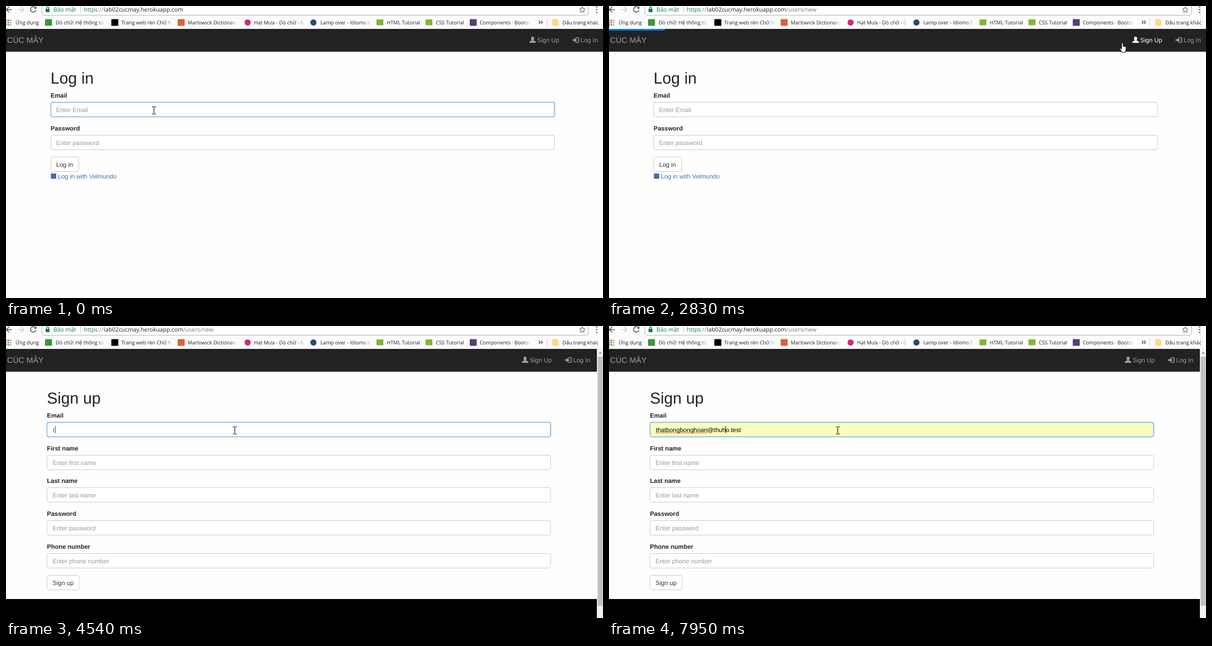
Recreate the animation shown at these times as an HTML page. Size 1071 px wide and 523 px high, loop 8 s.

```html
<!DOCTYPE html>
<html lang="en">
<head>
<meta charset="utf-8">
<title>Sign up form</title>
<style>
html, body { margin: 0; width: 100%; height: 100%; overflow: hidden; background: #fefefe; }
svg { display: block; text-rendering: geometricPrecision; }
text { white-space: pre; }
.page { font: 11.1px "Liberation Sans", Arial, sans-serif; }
.page text { fill: #333; }
.page .bold { font-weight: bold; fill: #222; }
.page .hint { fill: #999; }
.ui { font: 9.2px "Open Sans", "Noto Sans", sans-serif; fill: #222; }
.url { font-size: 10.4px; }
.box { fill: #fff; stroke: #ccc; }
</style>
</head>
<body>
<svg id="stage" width="1071" height="523" viewBox="0 0 1071 523"></svg>
<script>
const LOOP = 8000;
const EMAIL = "thatbongbonghoan@thuho.test";
const TYPED = 8;
const TEXT_X = 84;
const FIELD_W = 903.5;
const stage = document.getElementById("stage");

const text = (x, y, s, attrs = "") => `<text x="${x}" y="${y}" ${attrs}>${s}</text>`;
const rect = (x, y, w, h, attrs = "") =>
  `<rect x="${x}" y="${y}" width="${w}" height="${h}" ${attrs}/>`;
const path = (d, attrs = "") => `<path d="${d}" ${attrs}/>`;
const dot = (x, y, r, fill) => `<circle cx="${x}" cy="${y}" r="${r}" fill="${fill}"/>`;
const line = (d, color, w = 1) => path(d, `fill="none" stroke="${color}" stroke-width="${w}"`);

// Browser chrome

// A label that runs past its end is cut there and fades out
function bookmark(x, label, icon, end) {
  if (!end) return icon + text(x, 33, label);
  return `${icon}<svg x="${x}" y="0" width="${end - x}" height="41">${text(0, 33, label)}</svg>` +
    rect(end - 14, 20, 14, 19, 'fill="url(#fade)"');
}

function appsGrid() {
  const colors = ["#e2483d", "#e2483d", "#e8a33d", "#3f9c5a", "#4a86e8", "#e8a33d", "#3f9c5a", "#3f9c5a", "#e8a33d"];
  return colors.map((c, i) => rect(-1 + i % 3 * 4, 24.5 + Math.floor(i / 3) * 4, 2.6, 2.6, `fill="${c}"`)).join("");
}

function browser() {
  const square = (x, color, y = 23.5, h = 12) => rect(x, y, 12.5, h, `rx="1" fill="${color}"`);
  return `<g class="ui">
    ${rect(0, 0, 1071, 41, 'fill="#fcfcfc"')}
    ${path("M64.5 -4V13Q64.5 16.5 68 16.5H1041Q1044.5 16.5 1044.5 13V-4", 'fill="#fff" stroke="#b4b4b4"')}
    ${line("M10.5 6.5H1M5.5 1.5L.5 6.5L5.5 11.5", "#555", 1.5)}
    ${line("M22 6.5H31.5M27 1.5L32 6.5L27 11.5", "#d0d0d0", 1.5)}
    ${line("M52.8 3A4.9 4.9 0 1 0 53.8 7.5", "#555", 1.5)}
    ${path("M54.5 .5V5H50Z", 'fill="#555"')}
    ${rect(71, 5, 7, 6, 'rx=".6" fill="#0b8043"')}
    ${line("M72.5 5V3.4a2 2 0 0 1 4 0V5", "#0b8043", 1.3)}
    <g class="url">
      ${text(85, 10, "Bảo mật", 'fill="#0b8043"')}
      ${line("M133.5 0V13", "#ccc")}
      ${text(139.5, 10, 'https<tspan fill="#777">://</tspan>', 'fill="#0b8043"')}
      ${text(175.5, 10, 'lab02cucmay.herokuapp.com<tspan id="route" fill="#777">/users/new</tspan>')}
    </g>
    ${path("M1034 1.5l1.5 3.4 3.7.4-2.8 2.5.8 3.7-3.2-1.9-3.2 1.9.8-3.7-2.8-2.5 3.7-.4z", 'fill="none" stroke="#555"')}
    ${[1.5, 6.5, 11.5].map(y => dot(1059.5, y, 1.2, "#555")).join("")}
    ${rect(975, 19, 92, 20, 'id="folderHover" rx="2" fill="#ececec"')}
    ${appsGrid()}
    ${text(17, 33, "Ứng dụng")}
    ${bookmark(89, "Dò chữ: Hệ thống từ điển", square(70, "#3c963c"), 178)}
    ${bookmark(207, "Trang web rèn Chữ Nghĩa", square(189, "#000"), 298)}
    ${bookmark(326, "Marlowick Dictionary", square(308, "#d8652f"), 416)}
    ${bookmark(445, "Hạt Mưa - Dò chữ - Dò chữ", dot(433.5, 29.5, 5.5, "#d4257c"), 536)}
    ${bookmark(564, "Lamp over - Idioms by Quill", dot(551.5, 29.5, 5.5, "#1f4e79"), 655)}
    ${bookmark(683, "HTML Tutorial", square(664.5, "#7ab835", 24, 10.5))}
    ${bookmark(771, "CSS Tutorial", square(752.5, "#7ab835", 24, 10.5))}
    ${bookmark(850, "Components · Bootstrap", square(832, "#563d7c"), 941)}
    ${line("M956 26.5L958.5 29.3L956 32M960 26.5L962.5 29.3L960 32", "#333", 1.2)}
    ${line("M970.5 23V36", "#ccc")}
    ${path("M980.5 24H988L990.5 26.5V35H980.5Z", 'fill="#fbdc82" stroke="#ecc75f" stroke-width=".6"')}
    ${text(998, 33, "Dấu trang khác")}
  </g>`;
}

// Page

function nav() {
  return `${rect(0, 41, 1071, 40.5, 'fill="#222"')}${rect(0, 80.7, 1071, .8, 'fill="#080808"')}
    ${text(2, 66, "CÚC MÂY", 'font-size="14.2" style="fill:#9d9d9d"')}
    <g id="links">
      <g id="signLink">
        <ellipse cx="944.7" cy="58.3" rx="2.8" ry="3.5"/>
        ${path("M939 66V64.3Q939.3 63 943 61.6H946.4Q950.1 63 950.4 64.3V66Z")}
        ${text(953, 65, "Sign Up", 'style="fill:inherit"')}
      </g>
      <g fill="#9d9d9d">
        ${path("M1016.5 59.5H1020V56.8L1024.5 61L1020 65.2V62.5H1016.5Z")}
        ${line("M1022 56.7H1025.8Q1027.5 56.7 1027.5 58.4V63.6Q1027.5 65.3 1025.8 65.3H1022", "#9d9d9d", 1.5)}
        ${text(1031, 65, "Log In", 'style="fill:inherit"')}
      </g>
    </g>`;
}

const field = (x, i, label, hint) => {
  const y = 58.7 * i;
  return text(x, 164 + y, label, 'class="bold"') +
    rect(Math.floor(x) + .5, Math.round(172 + y) + .5, FIELD_W, 26, 'class="box" rx="3"') +
    text(x + 10, 190 + y, hint, 'class="hint"');
};

const button = (x, y, w, label) =>
  rect(Math.floor(x) + .5, y + .5, w, 26, 'class="box" rx="3"') + text(x + 10, y + 17.5, label);

const title = (x, s) => text(x, 139, s, 'font-size="28.4" style="fill:#222"');

const glow = (x, id) => `<g id="${id}" fill="none" stroke="#66afe9">
  ${rect(x, 172.5, FIELD_W, 26, 'rx="3" stroke-width="1.5" opacity=".45" filter="url(#blur)"')}
  ${rect(x, 172.5, FIELD_W, 26, 'rx="3"')}</g>`;

function loginPage() {
  return `<g id="login">
    ${title(80, "Log in")}
    ${field(80, 0, "Email", "Enter Email")}
    ${field(80, 1, "Password", "Enter password")}
    ${glow(80.5, "loginGlow")}
    ${button(80, 270, 50, "Log in")}
    ${rect(80.5, 300, 9.5, 9.5, 'rx="1" fill="#3b6cb4"')}
    ${text(93, 309, "Log in with Velmundo", 'style="fill:#3b73b4"')}
  </g>`;
}

function signupPage() {
  const x = 73.5;
  const fields = [["Email", ""], ["First name", "Enter first name"], ["Last name", "Enter last name"],
    ["Password", "Enter password"], ["Phone number", "Enter phone number"]];
  return `<g id="signup">
    ${title(x, "Sign up")}
    ${fields.map(([label, hint], i) => field(x, i, label, hint)).join("")}
    ${rect(x, 172.5, FIELD_W, 26, 'id="filled" rx="3" fill="#faffbd"')}
    ${glow(x, "signupGlow")}
    ${text(TEXT_X - .5, 190, "Enter Email", 'id="emailHint" class="hint"')}
    ${rect(0, 179, 0, 13, 'id="mark" fill="#3390ff"')}
    <text id="email" x="${TEXT_X}" y="190"><tspan id="head"></tspan><tspan id="tail"></tspan></text>
    <path id="squiggle" fill="none" stroke="#e02020" stroke-dasharray="2 1"/>
    ${button(x, 446, 57.5, "Sign up")}
    ${rect(0, 489, 1060, 34, 'fill="#000"')}
    ${rect(1060, 41, 11, 482, 'fill="#f1f1f1"')}
    ${rect(1061.5, 55, 9, 446, 'fill="#c1c1c1"')}
    ${path("M1063.5 49.5L1066 46.5L1068.5 49.5Z", 'fill="#777"')}
    <g id="menu" class="ui" style="font-size:9.1px;font-weight:bold">
      <rect id="menuBox" x="73.5" y="199.5" width="905" fill="#fff" stroke="#ccc"/>
      ${rect(74, 199, 904.5, 20, 'id="menuHover" fill="#c0dcf5"')}
      ${text(80, 213, EMAIL, 'style="fill:#000"')}
      ${text(80, 232, "thatbong.hoan@thuho.test", 'style="fill:#000"')}
      ${text(80, 251.5, "thatbe@thuho.test", 'id="third" style="fill:#000"')}
    </g>
  </g>`;
}

const CURSORS = {
  beam: line("M-3-6.5H-.5L.5-5.7L1.5-6.5H4M.5-6V6M-3 6.5H-.5L.5 5.7L1.5 6.5H4", "#000"),
  arrow: path("M0 0V13L3 10.3L5 15L7 14.1L5 9.5H9Z", 'fill="#fff" stroke="#222"'),
  hand: path("M-1.3 9V1.2A1.3 1.3 0 0 1 1.3 1.2V6L5.6 7Q7 7.4 6.7 9L6.2 13L5.2 17H-.6L-4.2 11Q-4.8 9.4-3 9.6L-1.3 11Z",
    'fill="#fff" stroke="#111"')
};

stage.innerHTML = `<defs>
    <linearGradient id="fade"><stop stop-color="#fcfcfc" stop-opacity="0"/><stop offset="1" stop-color="#fcfcfc"/></linearGradient>
    <filter id="blur" x="-2%" y="-50%" width="104%" height="200%"><feGaussianBlur stdDeviation="1.4"/></filter>
  </defs>
  ${rect(0, 0, 1071, 523, 'fill="#fefefe"')}
  <g class="page">${loginPage()}${nav()}${signupPage()}</g>
  ${rect(0, 41, 0, 3, 'id="bar" fill="#0076ff"')}
  ${browser()}
  ${rect(0, 179, 1, 13, 'id="caret"')}
  ${Object.entries(CURSORS).map(([id, shape]) => `<g id="${id}">${shape}</g>`).join("")}`;

// Timeline: each row is [start time, ...values], held until the next row

const POINTER = [
  [0, "beam", 265, 187], [130, "beam", 300, 194], [270, "arrow", 380, 212], [400, "beam", 520, 187],
  [540, "arrow", 680, 140], [680, "arrow", 830, 90], [810, "arrow", 930, 50], [950, "arrow", 1000, 26],
  [1090, "hand", 995, 48], [1210, "hand", 978, 54], [1350, "hand", 966, 57],
  [2710, "hand", 952, 60], [2830, "hand", 921, 66], [2980, "arrow", 716, 108], [3120, "arrow", 575, 142],
  [3250, "beam", 490, 178], [3400, "beam", 445, 190], [3530, "arrow", 424, 200],
  [3670, "arrow", 415, 200], [3800, "beam", 410, 187]
];
const BAR = [[0, 0, 0], [2190, 40, 1], [2310, 80, 1], [2430, 100, 1], [2980, 607, 1],
  [3120, 1060, 1], [3250, 1060, .5], [3400, 0, 0]];
const LOGIN_FOCUS = [[0, 1], [1490, .5], [1630, 0]];
const SIGNUP_FOCUS = [[0, 0], [3930, .5], [4100, 1]];
const KEYS = [[0, 0], [4540, 1], [4670, 2], [4800, 3], [5080, 4], [5210, 5], [5350, 7], [5630, TYPED]];
const MENU = [[0, 0], [4670, 3], [5350, 2], [6330, 0]];
// Caret x; -1 hides it, 0 puts it after the typed text
const CARET = [[0, -1], [400, 90], [930, -1], [4100, 0], [6190, -1], [6460, 237], [6990, -1], [7390, 228], [7950, 208.5]];

const el = {};
stage.querySelectorAll("[id]").forEach(node => el[node.id] = node);
const at = (rows, t) => rows.filter(row => row[0] <= t).pop().slice(1);
const set = (id, attrs) => Object.entries(attrs).forEach(([k, v]) => el[id].setAttribute(k, v));
const show = (id, on) => set(id, { display: on ? "inline" : "none" });

function drawEmail(t) {
  const [count] = at(KEYS, t);
  const filled = t >= 6190;
  const selected = filled && t < 6330;
  const color = filled ? "#000" : "#555";
  el.head.textContent = EMAIL.slice(0, count);
  el.tail.textContent = filled ? EMAIL.slice(count) : "";
  set("email", { style: `fill:${color}` });
  set("tail", { fill: selected ? "#fff" : "#000" });
  show("filled", filled);
  show("emailHint", count === 0);

  const width = n => n ? el.email.getSubStringLength(0, n) : 0;
  show("mark", selected);
  if (selected) {
    set("mark", { x: TEXT_X + width(count), width: width(EMAIL.length) - width(count) });
  }
  show("squiggle", t >= 6330);
  if (t >= 6330) set("squiggle", { d: `M${TEXT_X} 191.5h${width(EMAIL.indexOf("@"))}` });

  const [caret] = at(CARET, t);
  show("caret", caret >= 0);
  set("caret", { x: caret || Math.ceil(TEXT_X + width(count)), fill: color });

  const [rows] = at(MENU, t);
  show("menu", rows > 0);
  show("third", rows === 3);
  show("menuHover", selected);
  set("menuBox", { height: rows * 19.5 });
}

function draw(t) {
  const signup = t >= 2980;
  show("login", !signup);
  show("signup", signup);
  show("route", t >= 1630);
  show("folderHover", t >= 950 && t < 1210);
  set("links", { transform: `translate(${signup ? -13.5 : 0})` });
  set("signLink", { fill: t >= 1090 && !signup ? "#fff" : "#9d9d9d" });
  set("loginGlow", { opacity: at(LOGIN_FOCUS, t)[0] });
  set("signupGlow", { opacity: at(SIGNUP_FOCUS, t)[0] });
  const [width, opacity] = at(BAR, t);
  set("bar", { width, opacity });
  drawEmail(t);

  const [kind, x, y] = at(POINTER, t);
  Object.keys(CURSORS).forEach(id => show(id, id === kind));
  set(kind, { transform: `translate(${x} ${y})` });
}

const start = performance.now();
function tick() {
  draw((performance.now() - start) % LOOP);
  requestAnimationFrame(tick);
}
tick();
</script>
</body>
</html>
```
